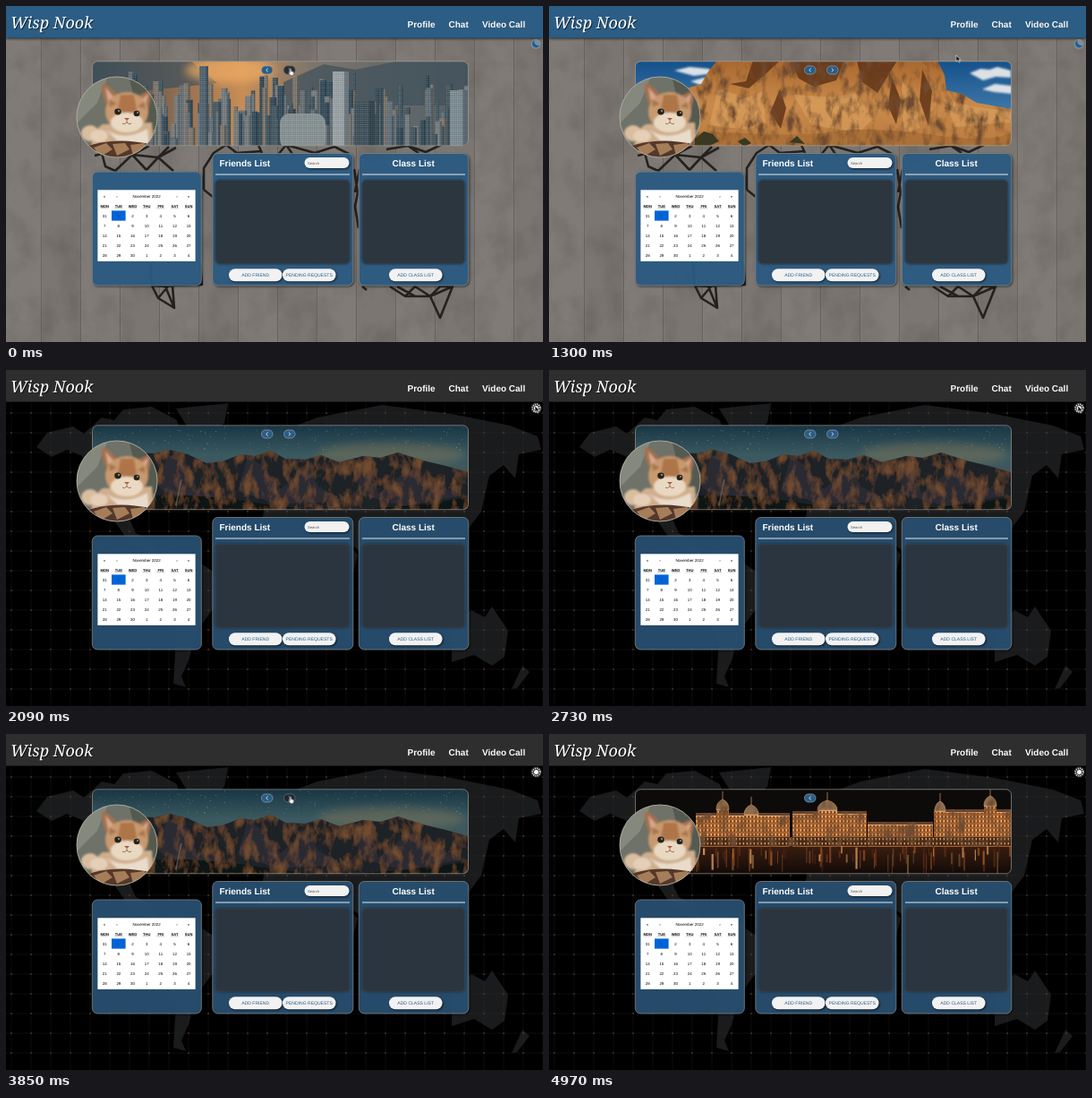
These frames come from a looping animation (600x375 px, 5000 ms). An HTML page:

```html
<!DOCTYPE html>
<html lang="en">
<head>
<meta charset="utf-8">
<title>Wisp Nook</title>
<style>
html, body { margin: 0; width: 100%; height: 100%; overflow: hidden; background: #000; }
svg { display: block; width: 100%; height: 100%; font-family: "Liberation Sans", Arial, sans-serif; text-rendering: geometricPrecision; }
.loop { animation: 5s step-end infinite; }
.day { animation-name: day; }
.night { animation-name: night; }
.city { animation-name: city; }
.desert { animation-name: desert; }
.peaks { animation-name: peaks; }
.dusk { animation-name: dusk; }
.river { animation-name: river; }
.bar { animation-name: bar; }
.card { animation-name: card; stroke: #87898a; stroke-width: .8; filter: drop-shadow(1.5px 1.5px 1.2px rgba(0,0,0,.6)); }
.next { animation-name: next; }
.hover { animation-name: hover; }
.hand { animation-name: hand; }
.arrow { animation-name: arrow; }
.cursor { animation: move 5s ease-in-out infinite; }
.box { fill: #2d3741; fill-opacity: .97; stroke: #3a4650; stroke-width: .8; filter: drop-shadow(0 0 1px rgba(20,30,40,.7)); }
.pill { fill: #f2f2f2; filter: drop-shadow(1px 1.2px .8px rgba(0,0,0,.65)); }
.head { font: bold 10px "Liberation Sans", Arial, sans-serif; fill: #fff; }
.label { font-size: 5.05px; fill: #285b87; text-anchor: middle; }
.cal { font-size: 4.4px; fill: #000; text-anchor: middle; }
.week { font-size: 4.1px; font-weight: bold; }
.logo { font: italic 18px "Noto Serif", "Liberation Serif", serif; fill: #fff; filter: drop-shadow(1px 1px .6px rgba(0,0,0,.6)); }
@keyframes day { 0% { visibility: visible } 38%, 100% { visibility: hidden } }
@keyframes night { 0% { visibility: hidden } 38%, 100% { visibility: visible } }
@keyframes city { 0% { visibility: visible } 6%, 100% { visibility: hidden } }
@keyframes desert { 0% { visibility: hidden } 6% { visibility: visible } 38%, 100% { visibility: hidden } }
@keyframes peaks { 0% { visibility: hidden } 38% { visibility: visible } 83%, 100% { visibility: hidden } }
@keyframes dusk { 0% { visibility: hidden } 83% { visibility: visible } 94%, 100% { visibility: hidden } }
@keyframes river { 0% { visibility: hidden } 94%, 100% { visibility: visible } }
@keyframes bar { 0% { fill: #2b5d85 } 38%, 100% { fill: #2e2e2e } }
@keyframes card { 0% { fill: #2b5a81 } 38%, 100% { fill: #284f70 } }
@keyframes next { 0% { visibility: visible } 94%, 100% { visibility: hidden } }
@keyframes hover {
  0% { fill: #262d33; stroke: #4c5359 }
  21% { fill: #2b5d85; stroke: #8799a6 }
  65%, 100% { fill: #20282d; stroke: #667078 }
}
@keyframes hand {
  0% { visibility: visible } 21% { visibility: hidden }
  65% { visibility: visible } 94%, 100% { visibility: hidden }
}
@keyframes arrow { 0% { visibility: hidden } 21% { visibility: visible } 65%, 100% { visibility: hidden } }
@keyframes move {
  0%, 20% { transform: translate(317px, 70px) }
  32%, 55.2% { transform: translate(591px, 40px) }
  66%, 100% { transform: translate(317px, 70px) }
}
</style>
</head>
<body>
<svg viewBox="0 0 600 375" preserveAspectRatio="none">
  <defs>
    <clipPath id="frame"><rect x="96.5" y="62" width="420" height="94" rx="6"/></clipPath>
    <clipPath id="round"><circle cx="124" cy="124" r="45"/></clipPath>
    <filter id="grain" x="0" y="0" width="1" height="1">
      <feTurbulence type="fractalNoise" baseFrequency=".035 .028" numOctaves="5" seed="4"/>
      <feColorMatrix values="0 0 0 0 .1  0 0 0 0 .09  0 0 0 0 .08  .75 0 0 0 -.29"/>
    </filter>
    <filter id="rough" x="0" y="0" width="1" height="1">
      <feTurbulence type="fractalNoise" baseFrequency=".09 .05" numOctaves="4" seed="9"/>
      <feColorMatrix values="0 0 0 0 .16  0 0 0 0 .07  0 0 0 0 .03  3 0 0 0 -1.3"/>
      <feComposite in2="SourceGraphic" operator="in" result="marks"/>
      <feMerge><feMergeNode in="SourceGraphic"/><feMergeNode in="marks"/></feMerge>
    </filter>
    <filter id="soft" x="-30%" y="-30%" width="160%" height="160%"><feGaussianBlur stdDeviation="5"/></filter>
    <filter id="fuzz"><feGaussianBlur stdDeviation=".8"/></filter>
    <pattern id="grid" width="22" height="22" patternUnits="userSpaceOnUse" patternTransform="translate(17 15)">
      <path d="M0 11H22M11 0V22" stroke="#41272c" stroke-opacity=".34" stroke-width=".7"/>
      <path d="M10 11h2M11 10v2" stroke="#444" stroke-width=".6"/>
    </pattern>
    <pattern id="panes" width="2.4" height="2.4" patternUnits="userSpaceOnUse">
      <rect width="1.1" height=".8" fill="#d5d3c6" opacity=".35"/>
      <rect x="1.2" y="1.2" width=".9" height=".8" fill="#18252d" opacity=".5"/>
    </pattern>
    <pattern id="lamps" width="4" height="5" patternUnits="userSpaceOnUse">
      <rect x=".6" y="1" width="1.4" height="2.4" fill="#ffdc9c" opacity=".7"/>
      <rect x="2.6" y="1" width="1" height="3" fill="#44200e" opacity=".75"/>
    </pattern>
    <linearGradient id="citySky" x2="1" y2="0">
      <stop stop-color="#34464e"/><stop offset=".25" stop-color="#9a7150"/>
      <stop offset=".4" stop-color="#c78d56"/><stop offset=".58" stop-color="#7d756d"/><stop offset="1" stop-color="#505f67"/>
    </linearGradient>
    <linearGradient id="blueSky" x2="0" y2="1"><stop stop-color="#14508a"/><stop offset="1" stop-color="#5e95bf"/></linearGradient>
    <linearGradient id="rock" x2="0" y2="1">
      <stop stop-color="#a9682f"/><stop offset=".5" stop-color="#c98a4b"/><stop offset="1" stop-color="#b87a3e"/>
    </linearGradient>
    <linearGradient id="starSky" x2="0" y2="1">
      <stop stop-color="#173443"/><stop offset=".35" stop-color="#3b5960"/><stop offset="1" stop-color="#4c5450"/>
    </linearGradient>
    <linearGradient id="duskSky" x2="0" y2="1">
      <stop stop-color="#2c2a2a"/><stop offset=".42" stop-color="#493a30"/>
      <stop offset=".7" stop-color="#875632"/><stop offset=".88" stop-color="#a1632e"/><stop offset="1" stop-color="#4a321f"/>
    </linearGradient>
    <linearGradient id="water" x2="0" y2="1"><stop stop-color="#3a1d10"/><stop offset="1" stop-color="#100a08"/></linearGradient>
  </defs>

  <g class="loop day">
    <rect width="600" height="375" fill="#7d7873"/>
    <rect width="600" height="375" filter="url(#grain)"/>
    <g id="planks"></g>
    <path fill="none" stroke="#24211f" stroke-width="2.6" stroke-linejoin="round"
      d="M99 156l8 8 4 15 13 6M99 167l20-5 22 4 16 17M122 184l19-18 19-10M141 166l29 3 12-12M157 183l13-14 17 15M170 169l20-11
         M221 205v-24l11-17 14-9 34-4 6 13M246 155l12 9 28-2M221 205l10 8M303 167l10-12 32 9 22-7 16 8M313 155l9 13
         M389 182l4 26-3 16 4 24M395 182l-5 26M425 160l24-4 20 7 17-8M449 156l12 8
         M161 287l2 25 7 14 18 11-10-24 10-1M163 312l15 1M170 326l11-13M188 337l-2-25M186 312l33-1-2-24
         M398 313l5 4M429 313l17 11h28l11 24 14-35-25 11-17-11-11 11M437 313l20 11M474 324l11-11 14 0"/>
  </g>
  <g class="loop night">
    <rect width="600" height="375"/>
    <path fill="#1a1b1c" d="M34 86l12-16 29-7 12 8 20-18 14 3 10-12 32-3 28 15 10 36-25 35-22 13-19 20 10 22 16 8 11 18-18-7-20-14-18-26-8-34-23-31-17-7-17 8z
      M190 43l58-6-4 22-29 25zM165 207l29-7 45 30-5 33-20 27-10 34-8 18 5 12-14-4 3-50-25-51z
      M270 112l30-41 48-18 72-14 78 10 65 13 31 12 4 15-25 5-4 27-13-15-16 12-9 40-28 37-22 17-43-20-41 11-47-33-60-8z
      M290 150l60 13 43 43-14 55-28 48-25 1-18-60-33-35zM498 286l22-18 15 8 8-12 18 27-4 29-14 10-20-12-25 8zM577 330l8 7-14 18-6 1z"/>
    <rect width="600" height="375" fill="url(#grid)"/>
  </g>

  <rect class="loop bar" width="600" height="35.5" style="filter: drop-shadow(0 1px 1.5px rgba(0,0,0,.7))"/>
  <text class="logo" x="5" y="25">Wisp Nook</text>
  <g class="head" style="filter: drop-shadow(.6px .8px .4px rgba(0,0,0,.45))">
    <text x="448.5" y="23.5">Profile</text><text x="494.5" y="23.5">Chat</text><text x="532" y="23.5">Video Call</text>
  </g>
  <g class="loop day">
    <circle cx="592" cy="42.5" r="5.6" fill="#7b8d9b"/>
    <path d="M590.5 38a4.4 4.4 0 1 0 5.8 6 4.6 4.6 0 0 1-5.8-6z" fill="#1e5b91"/>
  </g>
  <g class="loop night">
    <circle cx="592.5" cy="42.5" r="6" fill="#303030"/>
    <circle cx="592.5" cy="42.5" r="2.5" fill="#fff"/>
    <circle cx="592.5" cy="42.5" r="4.2" fill="none" stroke="#fff" stroke-width="1.7" stroke-dasharray="1 1.2"/>
  </g>

  <g clip-path="url(#frame)">
    <g id="city" class="loop city">
      <rect x="96" y="61" width="422" height="96" fill="url(#citySky)"/>
      <path d="M96 61h110l30 25-140 15zM310 85l45-20 35 6 50-10h78v50H310z" fill="#42525b" opacity=".75"/>
      <ellipse cx="250" cy="72" rx="50" ry="14" fill="#f1ad64" opacity=".7" filter="url(#soft)"/>
    </g>
    <g class="loop desert">
      <rect x="96" y="61" width="422" height="96" fill="url(#blueSky)"/>
      <g fill="#dbe1e5" filter="url(#fuzz)">
        <path d="M140 72l17-4 21 2 8 5-24 3zM158 84l15-4 10 5-12 4zM470 75l12-5 10 1 9-3 15 4v8l-17-1-14 4zM484 93l14-6 19 2v9l-20-2z"/>
      </g>
      <g filter="url(#rough)">
        <path d="M96 104l57-12 17-5 8-14 10-12h246l8 16 2 17 17 4 17 10 39 7v44H96z" fill="url(#rock)"/>
        <path d="M228 61l-8 23-18 3 21 5 21-18 14-13zM270 61l9 20 17 9 25-7 9-22zM344 61l6 24 17 12 11-18 11-18zM247 119l11-26 7 21-6 23zM383 79l10 26-5 27-9-20zM417 71l11 24-4 38-10-28z" fill="#5b2f16" opacity=".8"/>
        <path d="M189 92l32 11 18-8 3 35-19 8-44-5zM273 99l47 3 22-6 20 30-15 15-54-8zM394 84l16 17 4 35-18 7zM441 104l32 8 43 6v12l-62 5z" fill="#dfa563" opacity=".55"/>
        <path d="M96 144q65-6 124-2t100-2 110 4 88-4v17H96z" fill="#ac7139"/>
      </g>
      <path d="M163 148l10-8 10 3 7 8-13 6h-14zM211 151l8-4 7 6-8 4zM269 152l8-7 9 9z" fill="#393820"/>
    </g>
    <g id="peaks" class="loop peaks">
      <rect x="96" y="61" width="422" height="96" fill="url(#starSky)"/>
      <ellipse cx="430" cy="94" rx="82" ry="13" fill="#8c7c56" opacity=".4" filter="url(#soft)"/>
      <g filter="url(#rough)">
        <path d="M96 90l70 3 17-4 20 5 21 10 18-2 20-8 16 2 18-6 16 9 22 1 18-5 20 8 27-7 19 2 20-6 28 9 25 6 25 7v45H96z" fill="#1d2228"/>
        <path d="M180 94l25 12 8 26 33 10-46 10-29-21zM270 97l17 10 20 26 30-25 12 22 29 16-74 4-45-15zM391 106l17 3 8 29 35-29 23 16 36 15-67 12-48-14z" fill="#303237" opacity=".65"/>
        <path d="M96 145q100-12 190 4t232-7v15H96z" fill="#101417"/>
      </g>
      <path d="M196 122l-3 14-3 15" stroke="#7a7a79" stroke-width="1.5" opacity=".55" fill="none"/>
    </g>
    <g id="dusk" class="loop dusk">
      <rect x="96" y="61" width="422" height="96" fill="url(#duskSky)"/>
      <ellipse cx="442" cy="125" rx="120" ry="9" fill="#b5753a" opacity=".5" filter="url(#soft)"/>
      <path d="M160 120q65-8 135 0t222-4v8q-90 10-165 3t-192 1z" fill="#503727" opacity=".6" filter="url(#fuzz)"/>
      <path d="M96 142q67 4 123 3t100 7 101-3 98-2v10H96z" fill="#1c1712"/>
    </g>
    <g id="river" class="loop river">
      <rect x="96" y="61" width="422" height="96" fill="#0d0a0a"/>
      <rect x="96" y="125" width="422" height="32" fill="url(#water)"/>
    </g>
  </g>
  <rect x="96.5" y="61.8" width="420" height="94" rx="6" fill="none" stroke="#a8a49a" stroke-opacity=".7" stroke-width=".9"/>

  <g stroke-width=".8">
    <rect x="285.5" y="67" width="12.5" height="9" rx="4.3" fill="#2b5d85" stroke="#8799a6"/>
    <path d="M292.7 69.6l-2 1.9 2 1.9" fill="none" stroke="#fff"/>
    <g class="loop next">
      <rect class="loop hover" x="310.5" y="67" width="12.5" height="9" rx="4.3"/>
      <path d="M315.8 69.6l2 1.9-2 1.9" fill="none" stroke="#fff"/>
    </g>
  </g>

  <g clip-path="url(#round)">
    <rect x="78" y="78" width="92" height="92" fill="#6f7268"/>
    <path d="M78 78h36l-12 30-24 24z" fill="#85887d"/>
    <path d="M137 78h33v60h-18z" fill="#555a50"/>
    <g filter="url(#fuzz)">
      <path d="M108 132q-16 10-12 40h70l-3-42z" fill="#cfae8c"/>
      <path d="M107 86q7 1 18 14l-13 10q-6-12-5-24zM161 95q-9 1-17 9l14 12q5-10 3-21z" fill="#a5714e"/>
      <path d="M111 91l10 11-7 5zM159 98l-9 7 6 6z" fill="#d6a78e"/>
      <ellipse cx="135" cy="118" rx="24" ry="22" fill="#c8996e"/>
      <path d="M128 99h15l3 17-10 6-11-7z" fill="#ae7449"/>
      <path d="M115 104l9 5-8 4zM154 107l-7 5 9 3z" fill="#a87550"/>
      <ellipse cx="135" cy="130" rx="18" ry="11" fill="#ead9c2"/>
      <path d="M112 138q20 14 46-1l2 19-28 2z" fill="#eadccb"/>
      <ellipse cx="94" cy="142" rx="10" ry="9" fill="#d9bd9e"/><ellipse cx="104" cy="145" rx="10" ry="7" fill="#e5cfb8"/>
    </g>
    <g fill="#26251d"><ellipse cx="125" cy="118" rx="3.8" ry="3.4"/><ellipse cx="146" cy="120" rx="3.4" ry="3.2"/></g>
    <g fill="#fff"><circle cx="126" cy="117" r=".8"/><circle cx="147" cy="119" r=".7"/></g>
    <path d="M132 125h6l-3 3z" fill="#a95c4d"/><path d="M135 128v2q-3 3-5 1m5-1q3 3 5 1" fill="none" stroke="#885942" stroke-width=".8"/>
    <path d="M89 157q33-12 76-2v18H89z" fill="#54382a"/>
    <path d="M98 158l14-5 7 7-13 8zM119 154l14-1 5 7-14 7zM139 155l16-2 2 7-15 7z" fill="#a67d59"/>
  </g>
  <circle cx="124" cy="124" r="45" fill="none" stroke="#b5b3a9" stroke-width="1" opacity=".85"/>

  <g opacity=".95">
    <rect class="loop card" x="96.3" y="185" width="122" height="127" rx="6"/>
    <rect class="loop card" x="230.8" y="164.5" width="157" height="147.5" rx="6"/>
    <rect class="loop card" x="394.3" y="164.5" width="122.5" height="147.5" rx="6"/>
  </g>
  <g class="head"><text x="238.5" y="178.5">Friends List</text><text x="431.5" y="178.5">Class List</text></g>
  <path d="M234 188H384M398 188H513" stroke="#e4e9ed" stroke-width="1"/>
  <rect class="box" x="234" y="194.3" width="150" height="93.5" rx="5"/>
  <rect class="box" x="398" y="194.3" width="114.5" height="93.5" rx="5"/>
  <rect class="pill" x="333.5" y="169" width="50" height="12" rx="6"/>
  <text x="337" y="176.6" font-size="4.1" fill="#555">Search</text>
  <g id="buttons"></g>
  <rect x="102.4" y="205.3" width="109.2" height="79.6" fill="#fff"/>
  <g id="calendar" class="cal"></g>

  <g class="cursor">
    <path class="loop hand" d="M0 0q1-1 2 0v3l3 1q1 1 0 4l-1 1H1l-3-4q0-1 2 0z" transform="scale(.85)" fill="#fff" stroke="#111" stroke-width=".6"/>
    <path class="loop arrow" d="M0 0v7l1.7-1.5 1.3 2.6 1.2-.6-1.2-2.5h2.2z" fill="#111" stroke="#fff" stroke-width=".6"/>
  </g>
</svg>
<script>
let seed = 29;
const rnd = (a, b) => a + (b - a) * ((seed = seed * 16807 % 2147483647) / 2147483647);
const add = (id, markup) => document.getElementById(id).insertAdjacentHTML('beforeend', markup);
const many = (n, fn) => Array.from({ length: n }, (_, i) => fn(i)).join('');
const rect = (x, y, w, h, fill, more = '') =>
  `<rect x="${x}" y="${y}" width="${w}" height="${h}" fill="${fill}" ${more}/>`;
const text = (x, y, s, more = '') => `<text x="${x}" y="${y}" ${more}>${s}</text>`;
const pick = list => list[Math.floor(rnd(0, list.length))];

add('planks', many(14, i => {
  const x = -5 + i * 44;
  return rect(x, 36, 44, 339, i % 2 ? '#000' : '#fff', 'opacity=".02"') +
    rect(x, 36, .8, 339, '#544f4a', 'opacity=".65"') + rect(x + 1, 36, .6, 339, '#99918a', 'opacity=".3"');
}));

// Skyline, far towers first
const block = (x, y, w, fill) => {
  const h = 157 - y;
  return rect(x, y, w, h, fill) + rect(x, y, w, h, 'url(#panes)') + rect(x + w * .72, y, w * .28, h, '#172934', 'opacity=".35"');
};
add('city', many(190, i => block(rnd(96, 512), 82 + i * .33 + rnd(-10, 8), rnd(3, 9),
  pick(['#465963', '#65717a', '#7a7f80', '#344c5b', '#82786d']))) +
  block(216, 67, 10, '#546571') + block(365, 73, 18, '#9ea6a9') + block(389, 106, 23, '#40515b') +
  rect(306, 120, 51, 40, '#8a9597', 'rx="11"') + rect(306, 120, 51, 40, 'url(#panes)', 'rx="11"') +
  block(496, 94, 20, '#808e96'));

const stars = (n, bottom, fill) => many(n, () => rect(rnd(96, 516), rnd(63, bottom), .7, .7, fill, `opacity="${rnd(.2, .85)}"`));
add('peaks', stars(140, 89, '#c6d1bd'));
add('dusk', stars(75, 116, '#d0bda0'));

// Lit waterfront with its broken reflections
const hall = (x, y, w) => rect(x, y, w, 126 - y, '#ad642f') + rect(x, y, w, 126 - y, 'url(#lamps)') +
  rect(x, y - 3, w, 3, '#624132') + rect(x, y, w, .8, '#f2bc78');
const tower = (x, y, w) => hall(x - w / 2, y + 15, w) +
  `<path d="M${x - w / 2} ${y + 15}q0-8 ${w / 2}-11q${w / 2} 3 ${w / 2} 11zM${x} ${y - 5}v10" fill="#8d6c50" stroke="#c69761" stroke-width=".7"/>`;
add('river', `<g filter="url(#rough)">${hall(164, 91, 105) + hall(272, 89, 83) + hall(356, 101, 73) + hall(430, 87, 87) +
  tower(194, 69, 14) + tower(226, 75, 16) + tower(311, 70, 22) + tower(437, 71, 12) + tower(493, 65, 14) +
  rect(96, 115, 422, 10, '#4c2a18') + rect(96, 115, 422, 10, 'url(#lamps)')}</g>` +
  many(110, () => rect(rnd(96, 515), rnd(125, 135), rnd(.7, 2.4), rnd(7, 25),
    pick(['#a95b27', '#e2a666', '#6c3219']), `opacity="${rnd(.25, .85)}"`)));

add('buttons', [[249, 'ADD FRIEND'], [309, 'PENDING REQUESTS'], [428, 'ADD CLASS LIST']].map(([x, s]) =>
  rect(x, 293.3, 59.5, 14, '#f2f2f2', 'rx="7" class="pill"') + text(x + 29.7, 302.2, s, 'class="label"')).join(''));

const col = i => 110.2 + i * 15.65;
add('calendar', rect(118, 228.4, 15.6, 11.2, '#0064d8') +
  text(157, 213.6, 'November 2022') +
  [[110, '«'], [124, '‹'], [191, '›'], [204, '»']].map(([x, s]) => text(x, 213.6, s)).join('') +
  ['MON', 'TUE', 'WED', 'THU', 'FRI', 'SAT', 'SUN'].map((s, i) => text(col(i), 224.8, s, 'class="week"') +
    rect(col(i) - 4.5, 225.7, 9, .4, '#777')).join('') +
  many(35, i => {
    const day = i ? (i - 1) % 30 + 1 : 31;
    return text(col(i % 7), 235.6 + Math.floor(i / 7) * 11.2, day, i === 1 ? 'fill="#063d87"' : '');
  }));
</script>
</body>
</html>
```
